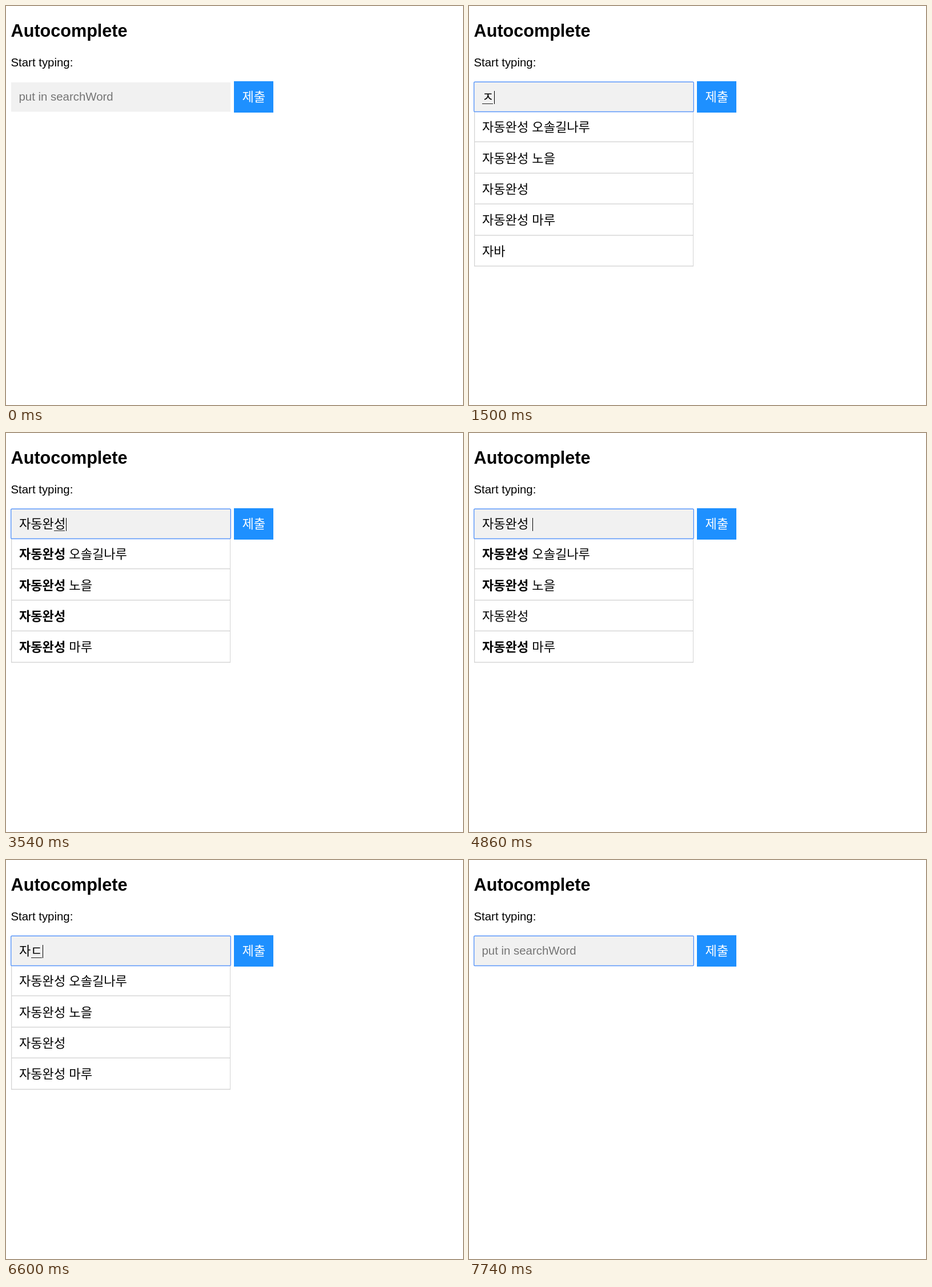
Recreate the animation shown at these times as an HTML page with a canvas. Size 800 px wide and 700 px high, loop 8 s.

```html
<!DOCTYPE html>
<html lang="ko">
<head>
<meta charset="utf-8">
<title>Autocomplete</title>
<style>
html, body { margin: 0; width: 100%; height: 100%; overflow: hidden; background: #fff; }
canvas { display: block; }
</style>
</head>
<body>
<canvas id="stage" width="800" height="700"></canvas>
<script>
const ctx = document.getElementById('stage').getContext('2d');
const LOOP = 8000;
const LATIN = '"Liberation Sans", Arial, sans-serif';
const HANGUL = '22.1px "Noto Sans CJK KR", "Noto Sans CJK", sans-serif';
const LEFT = 22.9, GAP = 6.1, STEP = 20.35;
const ITEMS = ['자동완성 오솔길나루', '자동완성 노을', '자동완성', '자동완성 마루', '자바'];

// Each step overrides the state before it; `mark` underlines the composed letter.
const STEPS = [
  { at: 0, focus: false, caret: false, hint: false, text: '', bold: '', rows: 0, mark: false },
  { at: 720, focus: true, caret: true },
  { at: 780, hint: true },
  { at: 1200, caret: false },
  { at: 1500, hint: false, caret: true, text: 'ㅈ', mark: true, rows: 5 },
  { at: 2040, text: '자', bold: '자' },
  { at: 2220, text: '잗', bold: '', rows: 4 },
  { at: 3540, text: '자동완성', bold: '자동완성' },
  { at: 4080, caret: false },
  { at: 4560, caret: true },
  { at: 4860, text: '자동완성 ', bold: '자동완성 ', mark: false },
  { at: 5220, text: '자동완성', caret: false },
  { at: 5340, bold: '자동완성' },
  { at: 5580, text: '자동완', bold: '자동완' },
  { at: 5760, text: '자동', bold: '자동' },
  { at: 5820, text: '자', caret: true },
  { at: 5880, bold: '자' },
  { at: 6360, caret: false },
  { at: 6600, text: '자ㄷ', bold: '', mark: true, caret: true },
  { at: 6720, text: '자도' },
  { at: 6780, text: '자동', bold: '자동' },
  { at: 6960, text: '자도', bold: '' },
  { at: 7080, text: '자ㄷ' },
  { at: 7260, text: '자', bold: '자', mark: false },
  { at: 7380, text: '', bold: '', rows: 0 },
  { at: 7740, caret: false }
];

function stateAt(t) {
  return Object.assign({}, ...STEPS.filter(s => s.at <= t));
}

function box(x, y, w, h, color) {
  ctx.fillStyle = color;
  ctx.fillRect(x, y, w, h);
}

function label(text, x, y, font, color = '#000') {
  ctx.font = font;
  ctx.fillStyle = color;
  ctx.fillText(text, x, y);
}

// Draws words with a fixed gap and returns the end position.
function words(text, x, y, weight = 400, color = '#000') {
  const font = weight + ' ' + HANGUL;
  text.split(' ').forEach((word, i) => {
    if (i) x += GAP;
    label(word, x, y, font, color);
    x += ctx.measureText(word).width;
  });
  return x;
}

function drawInput(s) {
  box(9, 134, 384, 51.5, '#f1f1f1');
  if (s.focus) {
    ctx.strokeStyle = '#5b97fa';
    ctx.lineWidth = 1.4;
    ctx.beginPath();
    ctx.roundRect(8.7, 133.2, 384.6, 52.3, 1.5);
    ctx.stroke();
  }
  if (s.text) words(s.text, LEFT, 167.4);
  else label('put in searchWord', 22.5, 166, '20.4px ' + LATIN, '#757575');

  const count = s.text.trim().length;
  const space = s.text.endsWith(' ') ? GAP : 0;
  if (s.mark) box(Math.round(23.4 + STEP * (count - 1)), 171, 19, 1, '#222');
  if (s.caret) box(Math.round(23.4 + STEP * count + space), 149, 1, 23, '#000');
}

function drawHint() {
  ctx.save();
  ctx.shadowColor = 'rgba(0,0,0,.38)';
  ctx.shadowBlur = 3;
  ctx.shadowOffsetY = 1;
  ctx.fillStyle = '#fff';
  ctx.beginPath();
  ctx.roundRect(8.5, 187, 384.5, 44, 3);
  ctx.fill();
  ctx.restore();
  label('a', 18.8, 213, '10px "Open Sans", sans-serif', '#222');
}

function drawList(s) {
  const end = 184 + 54.4 * s.rows;
  box(9, 186, 1.3, end - 185, '#d4d4d4');
  box(392, 186, 1, end - 185, '#d4d4d4');
  ITEMS.slice(0, s.rows).forEach((item, i) => {
    const base = 220.3 + 54.3 * i;
    const line = Math.round(184 + 54.4 * (i + 1));
    box(9, line - 0.4, 384, 1.4, '#d4d4d4');
    const n = item.startsWith(s.bold) ? s.bold.trimEnd().length : 0;
    const x = words(item.slice(0, n), LEFT, base, 700);
    words(item.slice(n), x, base);
  });
}

function draw(t) {
  const s = stateAt(t);
  box(0, 0, 800, 700, '#fff');
  label('Autocomplete', 8.6, 54, 'bold 30.6px ' + LATIN);
  label('Start typing:', 8.5, 106, '20.4px ' + LATIN);
  if (s.hint) drawHint();
  if (s.rows) drawList(s);
  drawInput(s);
  box(399, 132, 69, 55, '#1e90ff');
  words('제출', 413.4, 167.4, 400, '#fff');
}

const start = performance.now();
function tick() {
  draw((performance.now() - start) % LOOP);
  requestAnimationFrame(tick);
}
tick();
</script>
</body>
</html>
```
